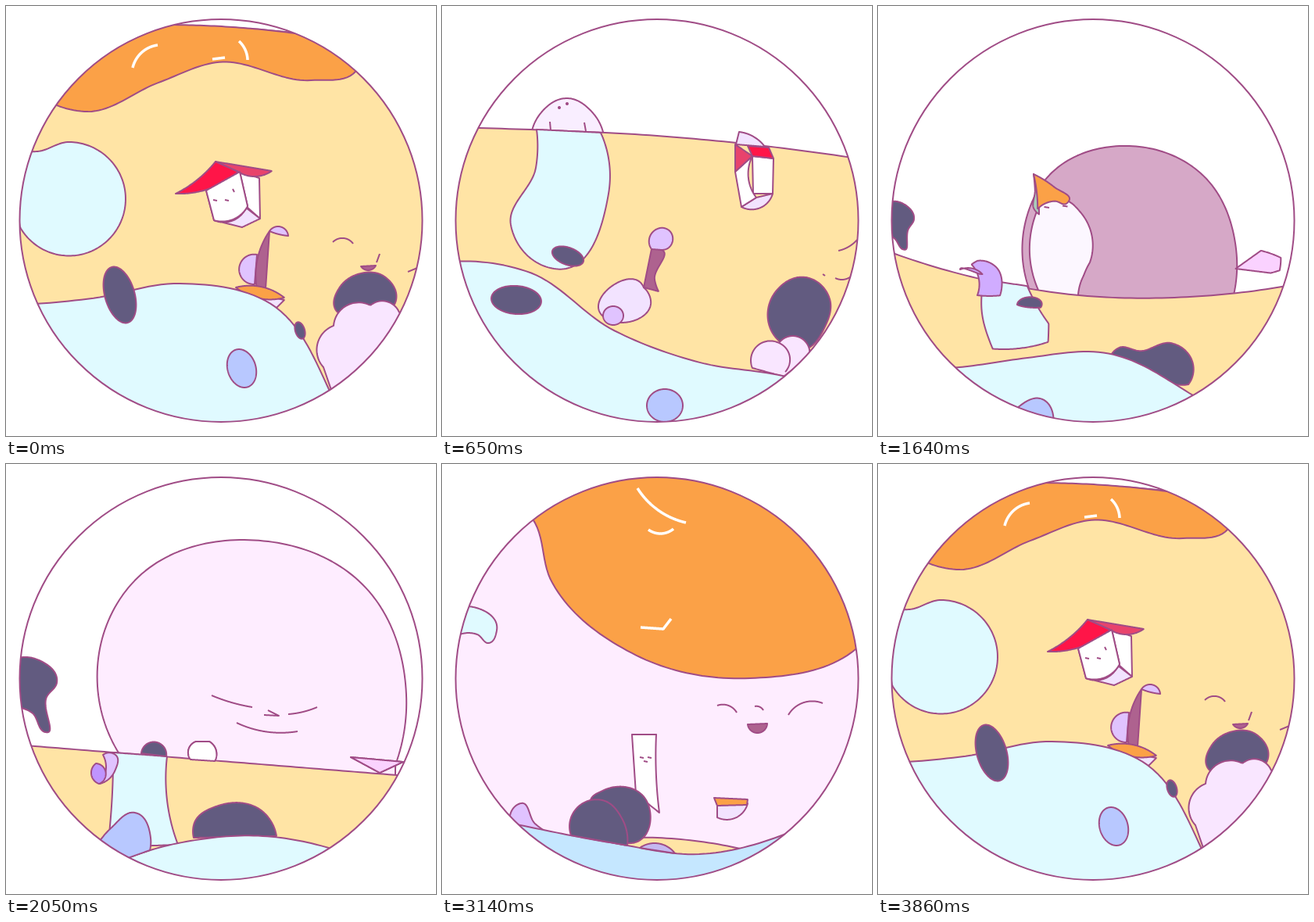
Animation of 550 by 550 pixels, one loop 3.93 s. Source, as an HTML page with a canvas:

```html
<!DOCTYPE html>
<html lang="en">
<head>
<meta charset="utf-8">
<title>Drifting globe</title>
<style>
  html, body { margin: 0; width: 100%; height: 100%; overflow: hidden; background: #fff; }
  canvas { display: block; width: 550px; height: 550px; }
</style>
</head>
<body>
<canvas id="stage" width="550" height="550"></canvas>
<script>
const ctx = document.getElementById('stage').getContext('2d');
const LOOP = 3930, STEP = 82.4, LEAD = 13;
const POSES = [0, 8, 15, 25, 32, 38, 47]; // drawing number of each pose
const SAMPLES = 200;
const INK = '#a04c86', SKIN = '#feedff', ORANGE = '#fba147', DARK = '#625b80', WATER = '#e0faff';
const MAROON = '#ae628f', VIOLET = '#bf94ff', LILAC = '#e0c3ff', PALE = '#f2e3ff', PINK = '#fad2ff', WHITE = '#ffffff';
const tracks = [];

const mix = (a, b, u) => a + (b - a) * u;
const mixPoint = (p, q, u) => [mix(p[0], q[0], u), mix(p[1], q[1], u)];
const dist = (p, q) => Math.hypot(q[0] - p[0], q[1] - p[1]);
const dot = (p, q) => p[0] * q[0] + p[1] * q[1];
const unit = (p, q) => [(q[0] - p[0]) / dist(p, q), (q[1] - p[1]) / dist(p, q)];

// Direction of the circle through three points, at the middle one
function tangent(a, p, b) {
  const into = unit(a, p), out = unit(p, b), d = dist(a, p), e = dist(p, b);
  const t = [into[0] * e + out[0] * d, into[1] * e + out[1] * d];
  return unit([0, 0], t);
}
// Mirrors a direction at the chord, which turns the span into an arc
function mirror(t, chord) {
  const k = 2 * dot(t, chord);
  return [k * chord[0] - t[0], k * chord[1] - t[1]];
}

// Smooth curve through "x,y x,y! ..." in evenly spaced samples; "!" marks a corner.
function trace(text, closed) {
  const words = text.split(' '), n = words.length;
  const pts = words.map(w => w.split(',').map(parseFloat));
  const at = i => pts[(i + n) % n];
  const sharp = i => words[i % n].endsWith('!') || !closed && (i === 0 || i === n - 1);
  const line = [pts[0]];
  for (let i = 0; i < (closed ? n : n - 1); i++) {
    const a = at(i), b = at(i + 1), chord = unit(a, b);
    let ta = sharp(i) ? null : tangent(at(i - 1), a, b);
    let tb = sharp(i + 1) ? null : tangent(a, b, at(i + 2));
    if (!ta && !tb) ta = tb = chord;
    ta = ta || mirror(tb, chord);
    tb = tb || mirror(ta, chord);
    const halfTurn = Math.sqrt(Math.max(0, 1 + dot(ta, tb)) / 2);
    const arm = dist(a, b) * 2 / (3 * (1 + halfTurn));
    for (let k = 1; k <= 30; k++) {
      const u = k / 30, v = 1 - u;
      line.push([0, 1].map(c => v * v * v * a[c] + 3 * v * v * u * (a[c] + ta[c] * arm)
        + 3 * v * u * u * (b[c] - tb[c] * arm) + u * u * u * b[c]));
    }
  }
  const run = [0];
  for (let i = 1; i < line.length; i++) run.push(run[i - 1] + dist(line[i - 1], line[i]));
  const total = run[run.length - 1];
  let i = 1;
  return Array.from({ length: SAMPLES }, (_, k) => {
    const d = total * k / (SAMPLES - 1);
    while (i < line.length - 1 && run[i] < d) i++;
    return mixPoint(line[i - 1], line[i], (d - run[i - 1]) / (run[i] - run[i - 1]));
  });
}

const oval = (x, y, rx, ry, tilt = 0) => Array.from({ length: SAMPLES }, (_, k) => {
  const a = Math.PI * (1 + 2 * k / SAMPLES), px = rx * Math.cos(a), py = ry * Math.sin(a);
  return [x + px * Math.cos(tilt) - py * Math.sin(tilt), y + px * Math.sin(tilt) + py * Math.cos(tilt)];
});
// Land below evenly spaced heights
const ridge = (...heights) => {
  const last = heights.length - 1;
  return heights.map((y, i) => `${550 * i / last},${y}${i % last ? '' : '!'}`).join(' ') + ' 550,570! 0,570!';
};
const dash = (x, y) => `${x},${y} ${x + 5},${y + 1}`;

// Parts list their outlines by pose; the loop closes on pose 0 unless pose 6 is given.
function add(keys, style) {
  const poses = POSES.map((_, i) => keys[i] ?? (i === 6 ? keys[0] : undefined));
  tracks.push({ ...style, poses: poses.map(k => typeof k === 'string' ? trace(k, !!style.fill) : k) });
}
const shape = (fill, keys) => add(keys, { fill, ink: INK, width: 2 });
const stroke = (keys, ink = INK, width = 2) => add(keys, { ink, width });

const CAPSULE = oval(145.5, 369.5, 19, 37, -0.28);
const FRONT = '266,274! 256,236! 299,212! 309,256! 290,273';
const FINGER = '121,200! 124,140 160,118 194,138 203,200!';
const BOX = '236,378! 236,360 243,355! 260,355! 267,362 267,380!';

// Giant head, rising finger and its hat
shape([MAROON, MAROON, MAROON, SKIN, SKIN, SKIN, SKIN], {
  1: oval(330, 430, 75, 70),
  2: '258,390! 254,330 270,285 325,260 374,278 404,330 405,390!',
  3: '145,371! 118,295 155,160 335,99 455,153 512,295 498,385! 498,410! 145,410!',
  4: oval(275, 275, 600, 600), 5: oval(275, 275, 600, 600), 6: oval(275, 330, 290, 290) });
shape(WHITE, { 2: oval(358, 268, 9, 4, 0.5) });
shape(['#f9eeff', '#f9eeff', '#f9eeff', WHITE], { 0: FINGER, 1: FINGER, 3: BOX,
  2: '173,346! 160,180 166,157 210,138 256,172 273,281! 256,320 257,380! 173,380!' });
stroke({ 2: '163,165 168,205 183,290 180,345' });
shape('#a9ccb9', { 1: oval(150, 130, 1, 1), 2: '148,70! 156,110 160,160! 160,173! 148,160 151,110', 3: oval(251, 360, 1, 1) });
shape(ORANGE, { 1: oval(160, 125, 1, 1), 2: '148,70! 200,104 236,140 230,146 200,139 157,158! 155,110', 3: oval(251, 360, 1, 1) });
stroke({ 1: '138,148 139,159', 2: '179,152 187,153', 3: dash(246, 362) });
stroke({ 1: '182,149 184,160', 2: '218,149 226,150', 3: dash(254, 362) });
stroke({ 2: '203,151 210,156' });
stroke({ 2: '199,172 210,171 222,172' });

// Sand, pond and hair with its shine
shape('#ffe4a5', { 0: ridge(30, 27, 27, 39, 60), 1: ridge(155, 159, 166, 179, 198), 2: ridge(260, 332, 363, 356, 316),
  3: ridge(358, 402), 4: ridge(418, 389, 384, 404, 455), 5: ridge(500, 488, 478, 500, 560) });
shape(WATER, {
  0: '0,180! 40,186 80,174 153,246 66,318 18,283!',
  1: '121,158! 203,162! 213,240 143,336 88,280 120,207',
  2: '134,331! 226,356! 164,387 128,355',
  3: '137,369! 206,374! 206,430 220,487! 130,490! 136,420',
  4: '40,407! 97,395! 113,435 133,471! 60,500!',
  5: '15,186! 40,183 70,213 60,229 45,218 15,222!' });
shape(ORANGE, {
  0: '100,28! 290,27 460,50! 447,84 390,95 270,72 195,98 100,135 50,120!',
  1: oval(290, -60, 190, 40), 3: oval(245, -60, 95, 50),
  4: '120,0! 352,0! 330,88 252,122 172,100 146,52',
  5: '60,20! 300,-20! 570,20! 529,237 395,274 245,243 140,150 117,72' });
const shine = keys => stroke(keys, WHITE, 3.5);
shine({ 0: '162,79 178,56 194,50', 1: dash(178, -60), 4: '206,68 222,73 244,72', 5: '250,31 275,58 312,75' });
shine({ 0: '264,68 280,66', 1: dash(270, -60), 4: '265,12 265,25', 5: '264,84 280,89 296,83' });
shine({ 0: '298,45 306,56 309,69', 1: dash(300, -60), 4: dash(300, -30), 5: '254,209 283,211! 293,198' });

// Face
stroke({ 0: '418,302 432,297 444,304', 1: '507,313 520,308 531,299', 3: '263,296 285,304 315,311',
  4: '327,319 342,320 358,316', 5: '352,309 363,308 377,318' });
stroke({ 0: '474,328 478,317', 1: '487,343 490,345', 3: '335,315 349,322! 330,321',
  4: '385,326 387,316 394,310', 5: '400,310 407,311 411,315' });
stroke({ 0: '514,340 526,335', 1: '503,348 512,350 523,346', 3: '361,320 380,317 398,311',
  4: '404,307 420,307 436,321', 5: '443,321 467,304 487,306' });
shape(MAROON, { 0: '454,333! 473,332! 463,338', 4: '382,337! 399,335! 394,339', 5: '391,333! 416,332! 403,344' });
stroke({ 3: '295,331 330,342 373,342' });

// House, and the box that folds into its front
shape(WHITE, { 0: '297,212! 324,220! 325,272! 307,256!', 1: '397,192! 424,195! 423,240! 398,240!' });
shape(PALE, { 0: '266,274! 285,276 307,258! 325,272! 302,283!', 1: '383,257! 402,245! 423,240! 415,253' });
shape(PALE, { 1: '380,161! 400,168 413,180! 376,177!' });
shape(WHITE, { 0: FRONT, 1: '383,257! 375,212! 397,192! 396,235 402,245!', 2: '479,339! 474,297! 540,286! 540,321!' });
shape('#e8436c', { 0: '268,199! 340,211! 320,218 297,212!', 1: '375,177! 397,192! 375,212!', 5: '255,346! 274,346! 265,348!' });
shape(['#ff1548', '#ff1548', PINK, PINK, PINK, '#ff1548'], {
  0: '217,240! 245,222 268,199! 297,212! 256,235', 1: '391,179! 418,181! 424,195! 397,192!',
  2: '474,297! 496,247! 515,257 540,286!', 3: '441,375! 508,381! 478,395!', 5: '243,346! 255,346! 265,348!' });
shape(WHITE, { 0: FRONT, 3: BOX, 4: '238,384! 223,325 228,319! 240,319! 266,330 276,385!',
  5: '248,422! 243,346! 274,346! 274,400 278,446!' });
stroke({ 4: '236,320 245,345 255,384' });
stroke({ 0: dash(265, 248), 4: dash(251, 346), 5: dash(253, 375) });
stroke({ 0: '290,234 292,238', 4: dash(263, 347), 5: dash(263, 375) });
stroke({ 0: dash(280, 248), 4: dash(260, 352), 5: dash(258, 380) });

// Sail, mast and flag, later a curl; then the boat
shape([LILAC, PALE], { 0: '321,318! 300,345 318,356!', 1: '258,360! 266,372 228,405 206,397' });
shape([MAROON, MAROON, VIOLET, LILAC, LILAC, LILAC, LILAC], {
  0: '321,362! 323,318 337,288! 332,362!', 1: '258,360! 268,311! 281,312 272,350 277,365!',
  2: '134,331! 129,298 112,280! 158,292 175,344!', 3: '120,409! 128,388 124,372! 140,372 139,393',
  4: '133,389! 120,361! 136,368 143,388!', 5: '110,472! 88,446 101,434 119,460 133,470!', 6: oval(-20, 460, 20, 20) });
shape([LILAC, LILAC, LILAC, VIOLET, VIOLET], { 0: '337,288! 348,282 361,294! 349,292', 1: '268,311! 272,287 284,284 281,312!',
  2: '95,291! 115,275 145,279! 112,282', 3: '115,383! 109,394 119,409! 126,403', 4: '103,360! 118,353 131,362!' });
shape([PALE, LILAC, LILAC, PINK, PINK, PALE], { 0: '300,364! 356,376! 345,387!', 1: oval(219, 396, 13, 12),
  3: '441,375! 508,381! 478,395!', 4: '418,404! 429,392! 458,402! 449,416!', 5: '352,437! 391,434! 380,450 352,452!' });
shape(ORANGE, { 0: '294,360! 330,360 356,373! 330,375', 4: '403,380! 429,392! 418,404!', 5: '348,427! 391,429! 390,436! 352,437!' });

// Beard, cloud, foreground hill and spots
shape(DARK, {
  0: '420,385 426,361 450,343 484,346 499,376 460,395', 1: '433,430 427,365 465,347 496,375 490,410 460,440',
  2: '358,412 376,411 408,443 450,429 468,443 421,487! 390,445', 3: '240,478! 240,462 275,436 330,446 346,476!',
  4: '206,488! 262,476 309,515 308,540! 268,532! 245,503', 5: '190,430 205,418 264,436 240,485 210,450' });
shape('#f9e6ff', { 0: '406,462! 401,425 419,409! 436,383 466,383! 490,379 503,392! 560,400! 480,520! 416,491!',
  1: '397,463! 402,436 431,431! 455,423 470,448! 437,474!', 5: oval(560, 520, 20, 20) });
stroke({ 1: '431,431 445,450 439,468' });
shape([WATER, WATER, WATER, WATER, WATER, '#c5e7ff'], {
  0: ridge(383, 374, 355, 376, 540, 700), 1: ridge(328, 340, 415, 456, 474, 510), 2: ridge(372, 396, 399, 407, 518, 640),
  3: ridge(560, 520, 485, 476, 500, 560), 4: ridge(560, 560), 5: ridge(440, 464, 485, 499, 473, 410) });
shape(DARK, { 0: oval(376, 415, 6, 11, -0.3), 1: oval(161, 320, 21, 11, 0.35), 2: oval(199, 394, 16, 5),
  3: '173,370! 185,356 205,374!', 4: '181,383! 175,362 193,353 212,383!', 5: '165,475! 205,430 231,455 237,488!', 6: CAPSULE });
shape(DARK, { 0: CAPSULE, 1: oval(95, 376, 32, 18, 0.08), 2: oval(16, 266, 11, 14),
  3: '0,312! 0,255! 40,250 65,280 52,298 50,343 33,318', 4: oval(-60, 280, 20, 20) });
shape(['#b8c8ff', '#b8c8ff', '#b8c8ff', '#b8c8ff', '#b8c8ff', '#c5b8f0'], {
  0: oval(301.5, 463.5, 18, 25, -0.3), 1: oval(285, 511, 23, 21), 2: oval(240, 580, 25, 25),
  3: '115,490! 135,465 165,446 185,478 184,494! 156,504!', 4: '110,473! 163,464 205,488 268,535! 150,560!', 5: '253,491! 272,485 298,498!' });

function mixColor(a, b, u) {
  const part = (c, i) => parseInt(c.slice(i, i + 2), 16);
  return `rgb(${[1, 3, 5].map(i => Math.round(mix(part(a, i), part(b, i), u)))})`;
}

function drawTrack({ poses, fill, ink, width }, i, u) {
  const from = poses[i], to = poses[i + 1] || (u === 0 && from);
  if (!from || !to) return;
  ctx.beginPath();
  from.forEach((p, k) => ctx.lineTo(...mixPoint(p, to[k], u)));
  if (fill) {
    const tone = k => typeof fill === 'string' ? fill : fill[k] || fill[0];
    ctx.closePath();
    ctx.fillStyle = mixColor(tone(i), tone(i + 1), u);
    ctx.fill();
  }
  ctx.strokeStyle = ink;
  ctx.lineWidth = width;
  ctx.stroke();
}

function globe() {
  ctx.beginPath();
  ctx.arc(275, 274.5, 257.5, 0, Math.PI * 2);
}

function draw(ms) {
  const drawing = Math.floor((ms % LOOP + LEAD) / STEP) % POSES[6];
  let i = 0;
  while (POSES[i + 1] <= drawing) i++;
  const u = (drawing - POSES[i]) / (POSES[i + 1] - POSES[i]);
  ctx.fillStyle = WHITE;
  ctx.fillRect(0, 0, 550, 550);
  ctx.lineJoin = 'round';
  ctx.save();
  globe();
  ctx.clip();
  tracks.forEach(track => drawTrack(track, i, u));
  ctx.restore();
  globe();
  ctx.strokeStyle = INK;
  ctx.lineWidth = 2;
  ctx.stroke();
}

const start = performance.now();
(function tick() {
  draw(performance.now() - start);
  requestAnimationFrame(tick);
})();
</script>
</body>
</html>
```
